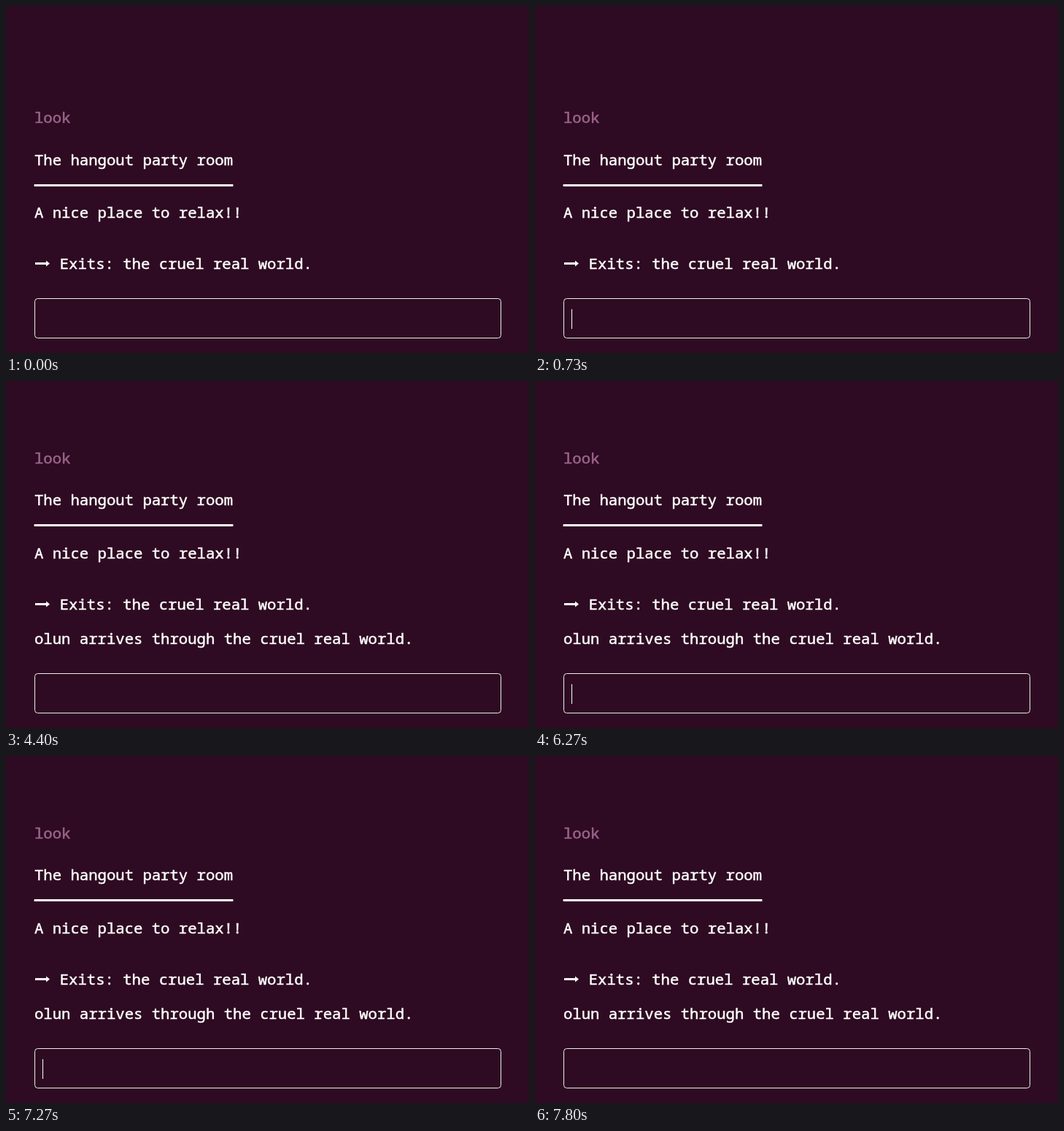
An HTML page that plays this animation: 717 by 475 pixels, repeating every 8000 ms.

```html
<!DOCTYPE html>
<html lang="en">
<head>
<meta charset="utf-8">
<title>Text adventure room</title>
<style>
  html, body { margin: 0; width: 100%; height: 100%; overflow: hidden; background: #2e0b22; }
  svg { display: block; width: 717px; height: 475px; color: #fff; fill: currentColor; }
  text {
    font: 20.62px "Noto Sans Mono", "DejaVu Sans Mono", monospace;
    stroke: currentColor;
    stroke-width: .5px;
  }
  .command { color: #9c668c; fill: currentColor; }
  .log, .arrival, .caret { animation: 8s step-end infinite; }
  .log { --rise: -47px; animation-name: scroll; }
  .heading { --rise: -48px; }
  .arrival { animation-name: arrive; }
  .caret { animation-name: blink; }

  @keyframes scroll {
    0% { transform: none; }
    55%, 100% { transform: translateY(var(--rise)); }
  }
  @keyframes arrive {
    0% { visibility: hidden; }
    55%, 100% { visibility: visible; }
  }
  @keyframes blink {
    0%, 15%, 84.125%, 97.5%, 100% { visibility: hidden; }
    9.125%, 78.375%, 90.875% { visibility: visible; }
  }
</style>
</head>
<body>
<svg viewBox="0 0 717 475">
  <g class="log">
    <text class="command" x="39" y="160">look</text>
    <text x="39" y="290">A nice place to relax!!</text>
    <path d="M40 351h15v-2.5l5 4-5 4v-2.5h-15z"/>
    <text x="73.7" y="360">Exits: the cruel real world.</text>
  </g>
  <g class="log heading">
    <text x="39" y="218">The hangout party room</text>
    <rect x="38.6" y="244" width="272.8" height="3"/>
  </g>
  <text class="arrival" x="39" y="360">olun arrives through the cruel real world.</text>
  <rect x="39.5" y="400.5" width="639" height="54" rx="4" fill="none" stroke="#eee"/>
  <rect class="caret" x="50" y="415" width="1" height="27"/>
</svg>
</body>
</html>
```
